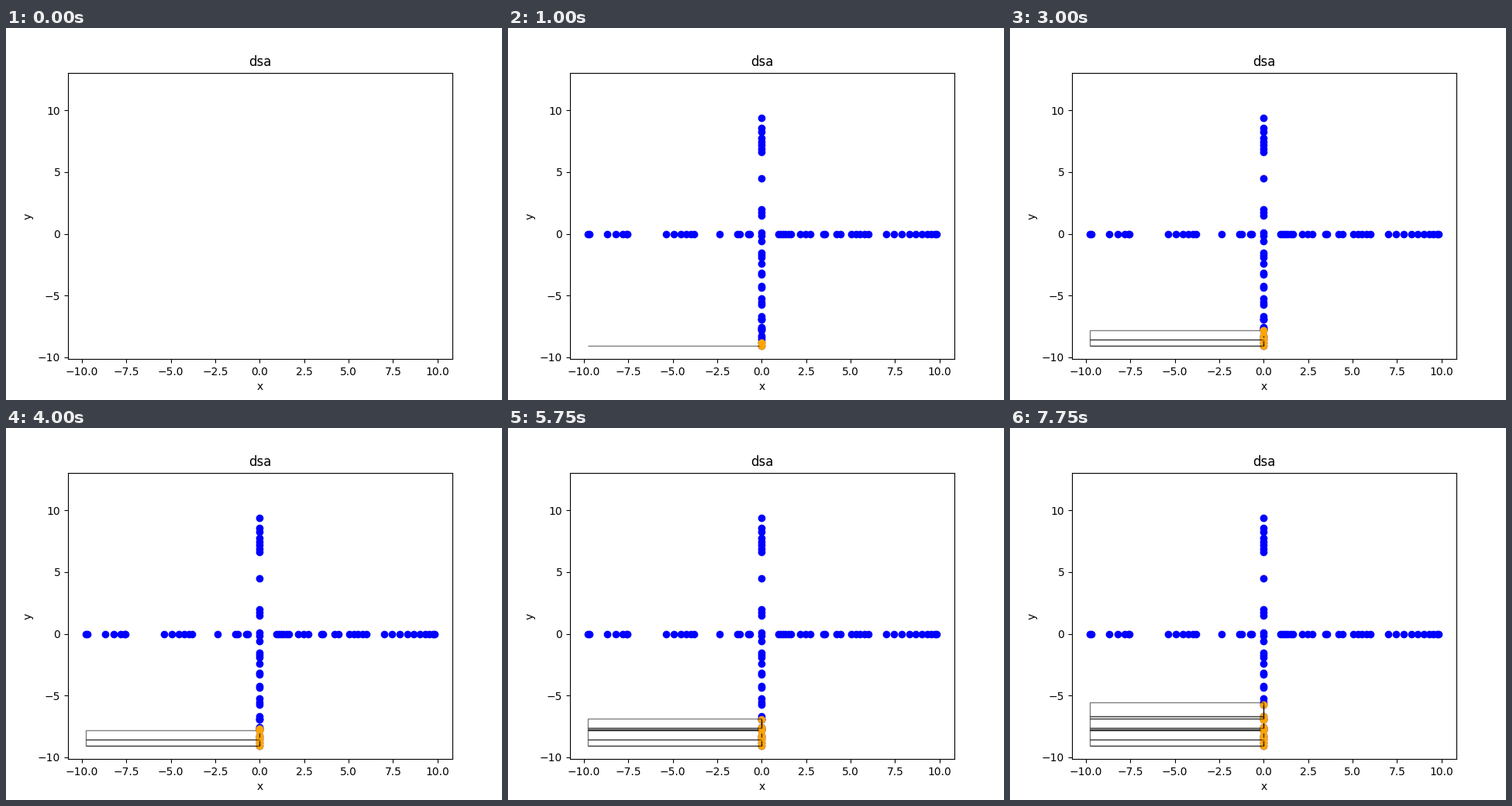
These frames come from a looping animation (640x480 px, 8 s). A matplotlib script:

```python
import matplotlib.pyplot as plt
import numpy as np
from matplotlib.animation import FuncAnimation
from matplotlib.patches import Rectangle

FRAMES, STEP_MS = 32, 250


def run(start, end, count, power=1):
    """Points from start to end, thinning or crowding by an ease-out power."""
    t = np.linspace(0, 1, count)
    return start + (end - start) * (1 - (1 - t) ** power)


def join(*runs):
    return np.concatenate([run(*r) for r in runs])


# points on the x axis
xs = join((-9.80, -9.68, 2), (-8.70, -7.54, 5, 2), (-5.40, -3.83, 6, 1.5),
          (-2.37, -2.37, 1), (-1.39, -1.24, 2), (-0.78, -0.67, 2),
          (0.92, 1.64, 6), (2.16, 2.75, 3), (3.45, 3.56, 2), (4.19, 4.41, 2),
          (5.06, 6.02, 5), (6.98, 9.85, 10, 1.5))

# points on the y axis from the bottom up
ys = join((-9.08, -8.27, 5, 1.5), (-7.80, -7.55, 5), (-6.95, -6.69, 4, 0.39),
          (-5.76, -5.23, 3, 0.78), (-4.38, -4.22, 2), (-3.28, -3.16, 2),
          (-2.44, -2.44, 1), (-1.90, -1.53, 3), (-0.58, -0.58, 1),
          (-0.14, 0.08, 2), (1.49, 1.99, 3), (4.47, 4.47, 1),
          (6.60, 7.73, 5), (8.24, 8.55, 2), (9.37, 9.37, 1))

# step -> index of the point the next slab reaches up to
SLAB_TOPS = {3: 0, 7: 2, 9: 5, 17: 6, 19: 8, 23: 12, 29: 13, 31: 15}

fig, ax = plt.subplots(figsize=(6.4, 4.8), dpi=100)
ax.set(title="dsa", xlabel="x", ylabel="y")
timeline = []


def add(step, artist):
    artist.set_zorder(1 + step / 100)
    timeline.append((step, artist))


def dots(step, x, y, color):
    add(step, ax.scatter(x, y, color=color))


def box(step, left, low, high, alpha):
    rect = Rectangle((left, low), -left, high - low, fill=False,
                     edgecolor="black", linewidth=1, alpha=alpha)
    add(step, ax.add_patch(rect))


dots(1, xs, 0 * xs, "blue")
dots(1, 0 * ys, ys, "blue")

# even steps mark the next point, odd steps connect it
low = 0
for step in range(2, FRAMES):
    k = step // 2 - 1
    if step % 2 == 0:
        dots(step, [0], [ys[k]], "orange")
        continue
    if k > 0:
        box(step, 0, ys[k - 1], ys[k], 0.8)
    if step in SLAB_TOPS:
        high = SLAB_TOPS[step]
        box(step, xs[0], ys[low], ys[high], 0.5)
        low = high

ax.set_xlim(-10.785, 10.837)
ax.set_ylim(-10.146, 13.056)


def update(frame):
    for step, artist in timeline:
        artist.set_visible(frame >= step)
    return [artist for _, artist in timeline]


anim = FuncAnimation(fig, update, frames=FRAMES, interval=STEP_MS,
                     init_func=lambda: update(0), repeat=True, repeat_delay=0)
plt.show()
```
